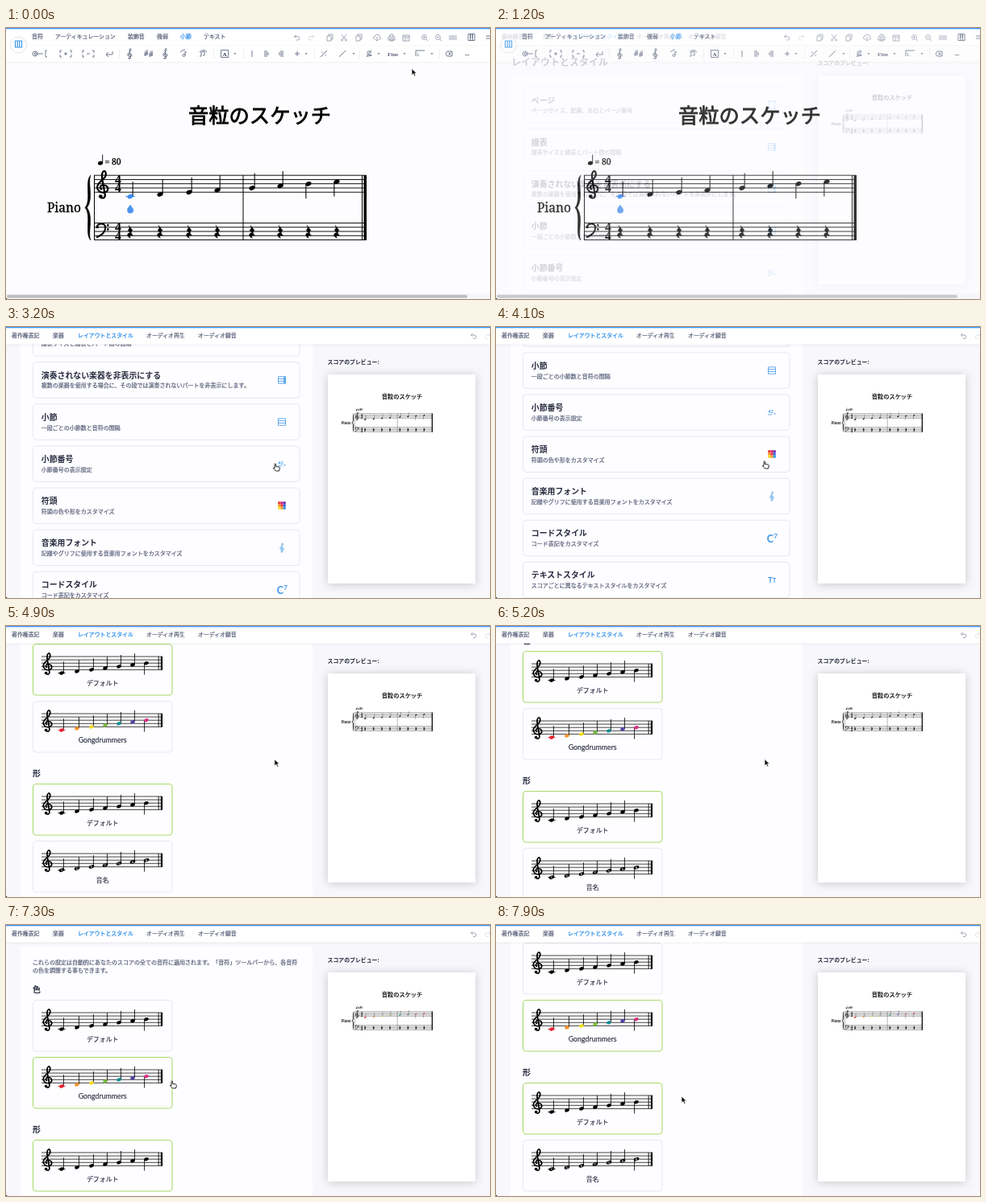
These frames come from a looping animation (600 by 337 pixels, 8000 ms). An HTML page:

```html
<!DOCTYPE html>
<html lang="ja">
<meta charset="utf-8">
<title>Score settings</title>
<style>
html, body { margin: 0; width: 100%; height: 100%; overflow: hidden; background: #fff }
svg { display: block; width: 600px; height: 337px }
text { font-family: "Noto Sans CJK JP", "Noto Sans CJK", sans-serif; white-space: pre; text-spacing-trim: space-all }
.serif { font-family: "Noto Serif", serif }
.time { font-family: "Liberation Serif", serif }
.latin { font-family: Lato, sans-serif }
.icon { fill: none; stroke: #4f5a75; stroke-width: .8 }
.light { fill: none; stroke: #848da2; stroke-width: .75 }
.blue { fill: none; stroke: #3d97e6; stroke-width: .8 }
.card { fill: #fefdff; stroke: #e7e7ef }
</style>
<svg id="stage" viewBox="0 0 600 337"></svg>
<script>
const INK = '#272b3f', GREY = '#5a607a', BLUE = '#1f87ea';
const TITLE = '音粒のスケッチ', BRAND = 'Gongdrummers';
const RAINBOW = ['#e8222e', '#f4932a', '#f3dc22', '#78bf3f', '#118f92', '#5545a5', '#d8307f', '#e8222e'];
const BLACK = Array(8).fill('#000');

// y is the vertical middle of the line
const text = (x, y, size, str, attrs = '') =>
  `<text x="${x}" y="${y + size * .37}" font-size="${size}" ${attrs}>${str}</text>`;
const path = (d, attrs = '') => `<path d="${d}" ${attrs}/>`;
const rect = (x, y, w, h, attrs = '') => `<rect x="${x}" y="${y}" width="${w}" height="${h}" ${attrs}/>`;
const at = (x, y, inner, s = 1) => `<g transform="translate(${x} ${y}) scale(${s})">${inner}</g>`;
const icon = (x, y, d, attrs = 'class="icon"') => at(x, y, path(d, attrs));
// A weight between regular and bold
const medium = (color, w = .22) => `fill="${color}" stroke="${color}" stroke-width="${w}"`;

// Notation: one unit is a staff space, y = 0 is the top line
const staff = (x, y, width, s, inner) => at(x, y,
  path([0, 1, 2, 3, 4].map(i => `M0 ${i}h${width / s}`).join(''), 'stroke="#000" stroke-width=".18"') + inner, s);
const trebleClef = (x, color = '#000') => at(x, 0, `<g transform="scale(1.15 1)">` +
  path('M1.1 3.4C.6 3 .75 2.3 1.4 2.3C2.2 2.3 2.5 3 2.3 3.5C2 4.25 .95 4.25 .5 3.7C-.1 3 .2 2.1 .9 1.4C1.6 .7 2.1 .2 1.9-.6C1.75-1.3 1.3-1.1 1.15-.3C1 .5 1.4 2 1.75 4.6C1.85 5.4 1.2 5.6 .8 5.2',
    `fill="none" stroke="${color}" stroke-width=".38"`) + `<circle cx=".85" cy="5" r=".4" fill="${color}"/></g>`);
const bassClef = x => at(x, 0,
  path('M.1 1.2C0 0 2.1-.3 2.1 1.1C2.1 2.4 1 3 0 3.4', 'fill="none" stroke="#000" stroke-width=".4"') +
  path('M.3 1h.01M2.7 .5h.01M2.7 1.5h.01', 'stroke="#000" stroke-width=".5" stroke-linecap="round"'));
const rest = x => at(x, 2, path('M-.4-1.5L.55-.3Q-.1 .2 .65 1Q-.5 .6 .1 1.6Q-1.1 1-.4 .4Q-.1 .2 .2 .5L-.55-.3Q.1-.8-.4-1.5z',
  'stroke="#000" stroke-width=".08"'));
const timeSignature = x => [1, 3].map(y =>
  `<text class="time" x="${x}" y="${y + 1}" font-size="3" font-weight="700" text-anchor="middle">4</text>`).join('');
const note = (x, step, color, letter = '') => at(x, 5 - step / 2,
  (step ? '' : path('M-1.1 0h2.2', `stroke="${color}" stroke-width=".22"`)) +
  path(step < 6 ? 'M.6-.1V-3.5' : 'M-.6 .1V3.5', 'stroke="#000" stroke-width=".2"') +
  `<ellipse rx="${letter ? .85 : .7}" ry=".5" transform="rotate(-22)" fill="${color}"/>` +
  (letter && `<text class="latin" y=".35" font-size="1" fill="#fff" text-anchor="middle">${letter}</text>`));

const noteX = [154, 191, 227, 262, 305, 340, 375, 410];
const sheet = colors => {
  const s = 5.25, px = x => (x - 109) / s;
  return text(314.5, 109, 25.3, TITLE, 'text-anchor="middle" ' + medium('#000', .8)) +
    text(51, 223.5, 15.5, 'Piano', 'class="serif" ' + medium('#000', .3)) +
    path('M105 183C97 190 106 215 98 223.500C106 232 97 257 105 264C101 254 109 235 100.500 223.500C109 212 101 193 105 183z', 'stroke="#000" stroke-width=".5"') +
    staff(109, 183.2, 337, s, trebleClef(.6) + timeSignature(px(139)) +
      noteX.map((x, i) => note(px(x), i, colors[i])).join('')) +
    staff(109, 242.5, 337, s, bassClef(.6) + timeSignature(px(139)) + noteX.map(x => rest(px(x))).join('')) +
    path('M109.500 183V264M294 183V264M441.500 183V264', 'stroke="#000"') + rect(443.5, 183, 3.5, 81) +
    '<ellipse cx="117" cy="168" rx="3.200" ry="2.400" transform="rotate(-20 117 168)"/>' + path('M119.700 167.500V157.500', 'stroke="#000" stroke-width=".9"') +
    text(122.5, 166.5, 10.4, '= 80', 'class="serif" ' + medium('#000', .3));
};

const miniStaff = (top, colors, letters = '') => staff(44, top + 15.5, 150, 4.1,
  trebleClef(.4) +
  [69, 88, 106, 123, 140, 157, 174].map((x, i) => note((x - 44) / 4.1, i, colors[i], letters[i])).join('') +
  path('M35.400 0V4', 'stroke="#000" stroke-width=".22"') + rect(36.05, 0, .55, 4));
const styleCard = (id, top, label, colors, letters) =>
  rect(33.5, top, 172.5, 63.5, `id="${id}" rx="4" class="card"`) + miniStaff(top, colors, letters) +
  text(119.7, top + 48.7, label === BRAND ? 8.8 : 7.9, label,
    `text-anchor="middle" ${medium(INK, .15)} ${label === BRAND ? 'class="latin"' : ''}`);

const tabs = (list, active) => list.map(([x, s]) =>
  text(x, 10.7, 6.9, s, medium(s === active ? BLUE : GREY))).join('');
const topLine = rect(0, 0, 600, 1.3, 'fill="#3795fb"');
const undo = 'M-1.500-3.500L-3.500-1.500L-1.500 .5M-3.500-1.500H1A2.300 2.300 0 0 1 1 3H-1';
const redo = 'M1.500-3.500L3.500-1.500L1.500 .5M3.500-1.500H-1A2.300 2.300 0 0 0-1 3H1';
const piano = 'M-4-4H4V4H-4zM-1.300-4V4M1.300-4V4M-1.300-4V1M1.300-4V1';

function toolbar() {
  const bar = 'M0-4V4', box = 'M-3-2H2V4H-3zM-1-2V-4H4V2H2', lens = 'M2 2L4 4M2.500-.5A3 3 0 1 1-3.500-.5A3 3 0 1 1 2.500-.5M-2-.5H1';
  const slur = 'M-3 3V-2L1-3V2M-5 3H-3M-1 2H1M-5-2Q0-7 4-2', brackets = 'M-5-4H-7V-1M-7 1V4H-5M5-4H7V-1M7 1V4H5M-2 0H2';
  const top = [[401, box], [419, 'M-3-4L1.500 2M3-4L-1.500 2M-1.500 3A1 1 0 1 1-3.500 3A1 1 0 1 1-1.500 3M3.500 3A1 1 0 1 1 1.500 3A1 1 0 1 1 3.500 3'], [437, box],
    [460, 'M-2 2H-3A2 2 0 0 1-2-2A2.500 2.500 0 0 1 3-1A1.500 1.500 0 0 1 3 2H2M0-1V4M-1.500 2.500L0 4L1.500 2.500'],
    [478, 'M-2-1V-4H2V-1M-4-1H4V3H-4zM-2 1H2V4H-2z'], [496, 'M-4-3H4V4H-4zM-4-1H4M-1-1V4M1 1H3'],
    [519, lens + 'M-.5-2V1'], [536, lens], [554, 'M-4-3V3M-2-3V3M0-3V3M2-3V3M4-3V3']];
  const tools = [[42, 'M-3 0A3 3 0 1 1-9 0A3 3 0 1 1-3 0M4 0H-7L-5-2M-7 0L-5 2M9-4H7V4H9'], [74, brackets + 'M0-2V2'], [102, brackets],
    [128, 'M4-3V1H-4L-1-2M-4 1L-1 4'], [177, 'M-4-4V3M-2-5V2M-6 0L-1-2M-6 2L-1 0M2-3V4M4-4V3M0 1L5-1M0 3L5 1'],
    [220, 'M2 2V-3M-1 2A1.500 1.500 0 1 0 2 2A1.500 1.500 0 1 0-1 2M2-3L4-1M-4-2Q-1-5 2-5'], [245, slur],
    [271, 'M-4.500-4.500H4.500V4.500H-4.500z'], [305, bar], [323, bar + 'M-2-4V4M2-2V2'], [341, bar + 'M2-4V4M-2-2V2'],
    [361, 'M-3 0H3M0-3V3'], [394, 'M-4 4L4-4M-3-2h1.500M1.500 2h1.500'], [417, 'M-4 4L4-4'],
    [450, 'M2-3Q-2-4-2-1.500T2 1.500T-2 3M-3 4L3-4M-3 1h1M2-1h1'], [514, 'M-6 3V-4H5'],
    [549, 'M-4 0L-2-3H4V3H-2zM-.500-1.500L2.500 1.500M2.500-1.500L-.500 1.500']];
  return rect(0, 0, 600, 43, 'fill="#fff"') + rect(0, 42.5, 600, .8, 'fill="#ededf4"') + rect(0, 21, 600, .5, 'fill="#f0f0f5"') + topLine +
    tabs([[32, '音符'], [61, 'アーティキュレーション'], [151, '装飾音'], [187, '強弱'], [216, '小節'], [245, 'テキスト']], '小節') +
    '<circle cx="15.500" cy="21" r="10" fill="#fff" stroke="#e2e2ec"/>' + icon(15.5, 20, piano, 'class="blue" style="stroke-width:1.2"') +
    icon(361, 12, undo, 'class="light"') + icon(378, 12, redo, 'class="light" opacity=".4"') +
    top.map(([x, d]) => icon(x, 12, d, 'class="light"')).join('') + icon(577, 11.5, piano) + icon(598, 12, 'M-3-2H3M-3 1H3') +
    tools.map(([x, d]) => icon(x, 32, d)).join('') +
    [153, 197].map(x => at(x - 2.5, 27.5, trebleClef(0, '#3c465f'), 2)).join('') +
    [284, 372, 431, 462, 494, 528].map(x => icon(x, 32, 'M-1.500-.7H1.500L0 1z', `fill="${GREY}"`)).join('') +
    [140, 257, 294, 382, 438, 537].map(x => rect(x, 26, .6, 12, 'fill="#e4e4ec"')).join('') +
    text(271, 32, 7, 'A', `class="time" font-weight="700" text-anchor="middle" fill="${INK}"`) +
    text(473, 32, 7, 'Fine', `class="time" font-weight="700" fill="${GREY}"`) +
    text(509, 33, 5, '1.', `class="latin" fill="${GREY}"`) + text(569, 31, 7, '…', `class="latin" ${medium(INK)}`);
}

const editor = rect(0, 0, 600, 337, 'fill="#fdfcff"') + sheet(['#3d8df0', ...BLACK]) +
  path('M154 219.500C156 223 158 224 158 226.500A3.900 3.900 0 0 1 150.200 226.500C150.200 224 152 223 154 219.500z', 'fill="#4f95ee"') +
  toolbar() + rect(0, 330, 600, 7, 'fill="#f6f6f8"') + rect(1, 331.7, 571, 4, 'rx="2" fill="#bfbfc2"');

const lines = 'M-4.500-4H4.500V4.500H-4.500zM-4.500-1.200H4.500M-4.500 1.600H4.500';
const blueIcon = (d, extra = '') => path(d, 'class="blue"') + extra;
const sideBar = rect(2, -4, 2.5, 8.5, 'fill="#3d97e6" opacity=".7"');
const swatch = ['#e63b3b', '#d5267d', '#6a35b5', '#f59a23', '#e63b3b', '#3f63d8', '#f4dd2a', '#f59a23', '#2c9be0']
  .map((c, i) => rect(i % 3 * 3.2 - 4.8, (i / 3 | 0) * 3.2 - 4.8, 3.2, 3.2, `fill="${c}"`)).join('');
const letters = (s, size) => text(0, 0, size, s, 'class="latin" font-weight="700" text-anchor="middle" fill="#3d97e6"');
const options = [
  ['ページ', 'ページサイズ、配置、余白とページ番号', blueIcon('M-3.500-5V5M3.500-5V5M-5-4.500H5M-5 4.500H5')],
  ['譜表', '譜表サイズと譜表とパート間の間隔', blueIcon(lines, sideBar)],
  ['演奏されない楽器を非表示にする', '複数の楽器を使用する場合に、その段では演奏されないパートを非表示にします。', blueIcon(lines, sideBar)],
  ['小節', '一段ごとの小節数と音符の間隔', blueIcon(lines)],
  ['小節番号', '小節番号の表示設定', at(-1.5, -1, letters('42', 5.5)) + blueIcon('M-5 3H0M2 2H5')],
  ['符頭', '符頭の色や形をカスタマイズ', swatch],
  ['音楽用フォント', '記譜やグリフに使用する音楽用フォントをカスタマイズ', at(-2.5, -3.5, trebleClef(0, '#3d97e6'), 1.75)],
  ['コードスタイル', 'コード表記をカスタマイズ', at(-2, 1, letters('C', 12.5)) + at(4.5, -2, letters('7', 8))],
  ['テキストスタイル', 'スコアごとに異なるテキストスタイルをカスタマイズ', at(-2, 0, letters('T', 9.5)) + at(3, .8, letters('T', 7))]];

const optionList = text(19, 43, 12, 'レイアウトとスタイル', `font-weight="700" fill="${INK}"`) +
  rect(18, 58, 362, 520, 'fill="#fefdff"') +
  options.map(([name, info, art], i) => at(33.5, 73.5 + 52.1 * i,
    rect(0, 0, 330.5, 44.5, 'rx="4" class="card"') +
    text(10.3, 16.5, 9.9, name, `font-weight="700" fill="${INK}"`) +
    text(10.3, 29.2, 7, info, medium(GREY)) + at(308.5, 22, art))).join('');

const noteStyles = rect(18, 26.5, 362, 480, 'fill="#fefdff"') +
  ['これらの設定は自動的にあなたのスコアの全ての音符に適用されます。「音符」ツールバーから、各音符', 'の色を調整する事もできます。']
    .map((s, i) => text(33, 46 + 10.5 * i, 7, s, medium(GREY))).join('') +
  text(33, 80.5, 10, '色', `font-weight="700" fill="${INK}"`) +
  styleCard('plain', 93.5, 'デフォルト', BLACK) + styleCard('rainbow', 164.5, BRAND, RAINBOW) +
  text(33, 254, 10, '形', `font-weight="700" fill="${INK}"`) +
  styleCard('shape', 267.5, 'デフォルト', BLACK) + styleCard('names', 338.5, '音名', BLACK, 'CDEFGAB');

const preview = (id, colors) => `<g id="${id}">${at(401.1, 55.2, sheet(colors), .286)}</g>`;
const settings = rect(0, 0, 600, 337, 'fill="#f8f8fc"') +
  `<g id="list">${optionList}</g><g id="styles">${noteStyles}</g>` +
  text(398.5, 43.5, 6.9, 'スコアのプレビュー:', `font-weight="700" fill="${INK}"`) +
  rect(399, 59, 183, 260, 'fill="#fff" style="filter:drop-shadow(0 1px 6px #0003)"') +
  preview('before', BLACK) + preview('after', RAINBOW) +
  rect(0, 0, 600, 21.5, 'fill="#fff" style="filter:drop-shadow(0 1px 1px #0001)"') + topLine +
  tabs([[7, '著作権表記'], [58, '楽器'], [89, 'レイアウトとスタイル'], [174, 'オーディオ再生'], [238, 'オーディオ録音']], 'レイアウトとスタイル') +
  icon(580, 11.5, undo, 'class="light"') + icon(597, 11.5, redo, 'class="light" opacity=".3"');

const outline = 'fill="#111" stroke="#fff" stroke-width=".7"';
stage.innerHTML = editor + `<g id="settings">${settings}</g>` + path('M0 335.500L1.500 337H0z') +
  `<g id="cursor">${path('M0 0V8.200L2 6.400L3.400 9.500L4.900 8.800L3.500 5.900H6.100z', 'id="arrow" ' + outline)}
  ${path('M0 1Q.8-.2 1.600 1V4L5.500 4.600Q6.500 5 6.300 6.500L5.600 9.500H1.400L-1.600 6.300Q-1.500 5 0 6z', 'id="hand" fill="#fff" stroke="#111" stroke-width=".9"')}</g>`;

const scrollList = [[2700, 0], [3200, 134], [3600, 198]];
const scrollStyles = [[4600, 0], [4900, 71], [5100, 71], [5200, 62], [5500, 0], [7700, 0], [7900, 71]];
const pointer = [[0, 503, 50.5], [100, 503, 50.5], [400, 604, 8], [1700, 604, 8], [2200, 371, 72.5], [2600, 333, 170], [3200, 333, 169.5],
  [4100, 332, 166.5], [5200, 333, 165.5], [5600, 333, 165.5], [6400, 205, 193.5], [7400, 205, 193.5], [7800, 230, 213]];

const smooth = k => k * k * (3 - 2 * k);
function track(keys, t, ease = k => k) {
  const next = keys.findIndex(k => k[0] > t);
  if (next < 1) return keys.at(next && -1).slice(1);
  const a = keys[next - 1], b = keys[next], k = ease((t - a[0]) / (b[0] - a[0]));
  return a.slice(1).map((v, i) => v + (b[i + 1] - v) * k);
}
const $ = id => document.getElementById(id);
const show = (id, on) => $(id).style.display = on ? '' : 'none';
const move = (id, x, y) => $(id).setAttribute('transform', `translate(${x} ${y})`);
const select = (id, on) => $(id).style.cssText = on ? 'stroke:#a9db6c;stroke-width:1.1' : '';
select('shape', true);

function draw(now) {
  const t = Math.floor(now % 8000 / 100) * 100;
  const stylesOpen = t >= 4300, colored = t >= 6900;
  $('settings').style.opacity = Math.max(0, Math.min(1, (t - 1100) / 500));
  show('list', !stylesOpen);
  show('styles', stylesOpen);
  move('list', 0, -track(scrollList, t)[0]);
  move('styles', 0, -track(scrollStyles, t)[0]);
  select('plain', !colored);
  select('rainbow', colored);
  show('before', t < 7100);
  show('after', t >= 7100);
  move('cursor', ...track(pointer, t, smooth));
  const overCard = t > 2200 && t < 4300 || t >= 6400 && t < 7500;
  show('hand', overCard);
  show('arrow', !overCard);
  requestAnimationFrame(draw);
}
requestAnimationFrame(draw);
</script>
</html>
```
